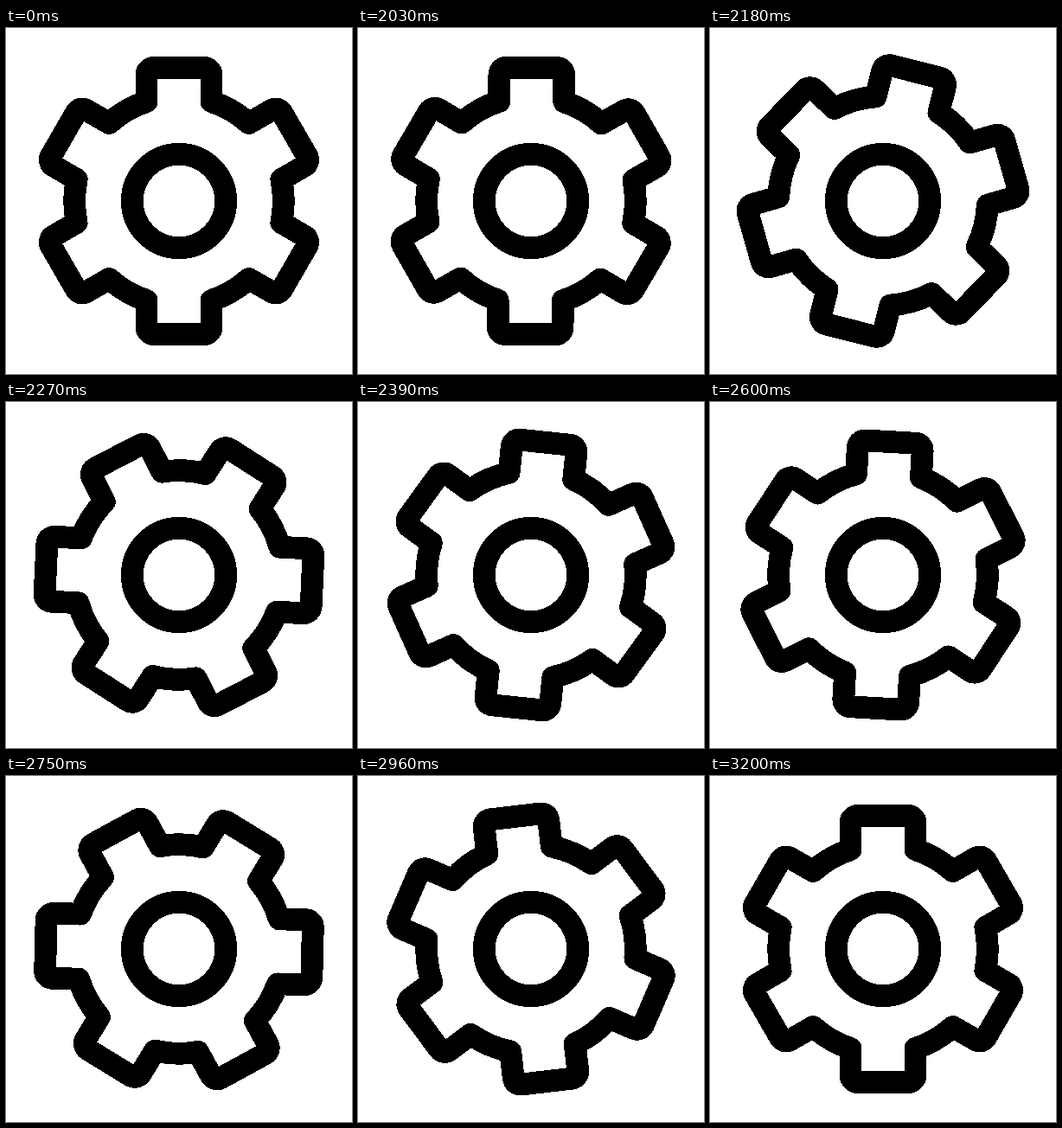
An HTML page for the animation above (3230 ms loop, 400 px wide and 400 px high).

```html
<!DOCTYPE html>
<html lang="en">
<head>
<meta charset="utf-8">
<title>Cog</title>
<style>
  html, body { margin: 0; height: 100%; overflow: hidden; background: #fff; }
  svg { display: block; width: 100%; height: 100%; }
  svg * { fill: none; stroke: #000; stroke-width: 1.548; stroke-linejoin: round; shape-rendering: crispEdges; }
</style>
</head>
<body>
<svg viewBox="-12 -12 24 24">
  <path id="cog"/>
  <circle r="3.25"/>
</svg>
<script>
  const LOOP = 3230, HOLD = 2000, STEP = 30;
  const SPIN = 1185, TURN = 180;
  const X1 = 1 / 3, X2 = 0.395;
  const cog = document.getElementById('cog');

  // Six teeth with rounded tips, joined by arcs of the body circle.
  function cogPath() {
    const body = 7.25, half = 2.25, tip = 9.25, r = 0.5;
    const foot = Math.sqrt(body * body - half * half);
    let d = '';
    for (let i = 0; i < 6; i++) {
      const a = i * Math.PI / 3, c = Math.cos(a), s = Math.sin(a);
      const at = (x, y) => `${(x * c + y * s).toFixed(4)} ${(x * s - y * c).toFixed(4)}`;
      const arc = (radius, x, y) => `A${radius} ${radius} 0 0 1 ${at(x, y)}`;
      d += (i ? arc(body, -half, foot) : 'M' + at(-half, foot))
        + 'L' + at(-half, tip - r) + arc(r, r - half, tip)
        + 'L' + at(half - r, tip) + arc(r, half, tip - r)
        + 'L' + at(half, foot);
    }
    return d + `A${body} ${body} 0 0 1 ${-half} ${-foot}Z`;
  }

  // cubic-bezier(X1, 0, X2, 1), solved by bisection
  function ease(x) {
    if (x <= 0) return 0;
    if (x >= 1) return 1;
    let lo = 0, hi = 1;
    for (let i = 0; i < 30; i++) {
      const s = (lo + hi) / 2, q = 1 - s;
      if (3 * q * s * (q * X1 + s * X2) + s * s * s < x) lo = s;
      else hi = s;
    }
    return lo * lo * (3 - 2 * lo);
  }

  function draw(now) {
    const t = now % LOOP;
    const stepped = Math.floor((t - HOLD) / STEP + 1e-6) * STEP;
    const angle = TURN * ease(stepped / SPIN);
    cog.setAttribute('transform', `rotate(${angle.toFixed(3)})`);
  }

  cog.setAttribute('d', cogPath());
  const t0 = performance.now();
  function tick() {
    draw(performance.now() - t0);
    requestAnimationFrame(tick);
  }
  tick();
</script>
</body>
</html>
```
